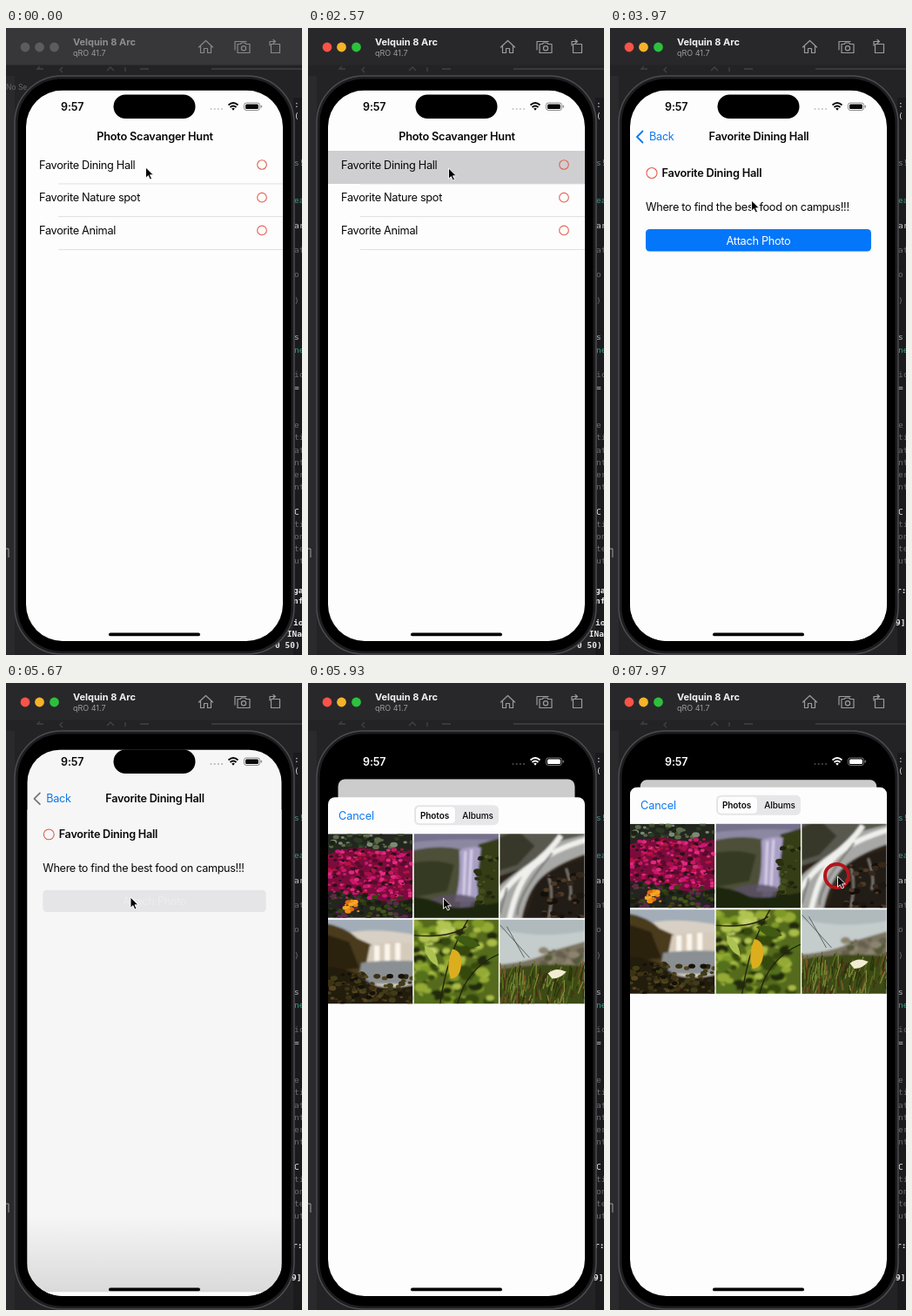
Animation, 340 px wide and 720 px high, one loop 8 s. Source, as an HTML page:

```html
<!DOCTYPE html>
<html lang="en">
<head>
<meta charset="utf-8">
<title>Photo Scavanger Hunt</title>
<style>
  html, body { margin: 0; width: 100%; height: 100%; overflow: hidden; background: #232326; }
  svg { display: block; }
  #stage { width: 340px; height: 720px; }
  text { font-family: Inter, "Open Sans", sans-serif; white-space: pre; }
  .code text { font-family: "DejaVu Sans Mono", monospace; }
</style>
</head>
<body>
<svg id="stage" viewBox="0 0 340 720" xmlns="http://www.w3.org/2000/svg"></svg>
<script>
const LOOP = 8000;
const PAPER = '#fdfdfd', INK = '#080808', BLUE = '#0f79ee', RED = '#e2604f', GREY = '#9b9b9e';

const label = (x, y, s, o = {}) => {
  const { size = 12.75, weight = 400, fill = INK, anchor = 'start', ls = -0.31, id = '' } = o;
  return `<text ${id && `id="${id}"`} x="${x}" y="${y}" font-size="${size}" font-weight="${weight}"
    fill="${fill}" text-anchor="${anchor}" letter-spacing="${ls}">${s}</text>`;
};
const rect = (x, y, w, h, fill, more = '') =>
  `<rect x="${x}" y="${y}" width="${w}" height="${h}" fill="${fill}" ${more}/>`;
const path = (d, fill, more = '') => `<path d="${d}" fill="${fill}" ${more}/>`;
const line = (d, color, w = 1, more = '') =>
  `<path d="${d}" fill="none" stroke="${color}" stroke-width="${w}" ${more}/>`;
const dot = (x, y, r, fill, more = '') => `<circle cx="${x}" cy="${y}" r="${r}" fill="${fill}" ${more}/>`;
const ring = (x, y, r) => dot(x, y, r, 'none', `stroke="${RED}" stroke-width="1.1"`);
const gradient = (id, a, b) =>
  `<linearGradient id="${id}" x2="0" y2="1"><stop stop-color="${a}"/><stop offset="1" stop-color="${b}"/></linearGradient>`;

function random(seed) {
  return () => (seed = (seed * 16807) % 2147483647) / 2147483647;
}
function blobs(seed, n, x, y, w, h, size, colors) {
  const rnd = random(seed);
  let out = '';
  for (let i = 0; i < n; i++) {
    const r = size * (0.5 + rnd());
    out += `<ellipse cx="${(x + rnd() * w).toFixed(1)}" cy="${(y + rnd() * h).toFixed(1)}" rx="${r.toFixed(1)}"
      ry="${(r * 0.7).toFixed(1)}" fill="${colors[Math.floor(rnd() * colors.length)]}"/>`;
  }
  return out;
}
function blades(seed, n, x, y, w, h, len, colors) {
  const rnd = random(seed);
  let out = '';
  for (let i = 0; i < n; i++) {
    const bx = x + rnd() * w, by = y + rnd() * h;
    out += line(`M${bx.toFixed(1)} ${by.toFixed(1)}l${(rnd() * 8 - 2).toFixed(1)} ${(-len * (0.5 + rnd())).toFixed(1)}`,
      colors[Math.floor(rnd() * colors.length)], 1.3);
  }
  return out;
}
const soft = s => `<g filter="url(#soft)">${s}</g>`;

const photos = [
  // flower bed
  rect(0, 0, 97, 97, '#22261f') +
  blobs(5, 45, 0, 0, 97, 16, 3, ['#3d4d2c', '#5c6c4a', '#1a2014', '#7c8a74', '#2c3a22']) +
  path('M0 24Q28 12 52 18T97 18V74Q70 82 50 74T0 66Z', '#7a0c3c') +
  blobs(11, 260, 0, 18, 97, 56, 2.3, ['#cc1668', '#a90f4c', '#e02a80', '#5a0a2c', '#b8123e', '#2c1016', '#c81a78']) +
  blobs(23, 90, 0, 70, 97, 27, 2.6, ['#2c3a14', '#46541e', '#181e0c', '#5a2a4c', '#34162c', '#38460f']) +
  blobs(31, 14, 19, 75, 16, 16, 2.8, ['#f08c14', '#f6a624', '#dc6c14']),
  // valley waterfall
  soft(rect(-5, -5, 107, 107, '#8d88a2') + path('M-5 -5H102V8Q50 4 -5 10Z', '#74708c') +
    path('M-5 20Q30 12 54 18L60 34 50 102H-5Z', '#4e5038') +
    path('M-5 34Q26 28 46 36L38 66 -5 74Z', '#343a20') +
    path('M74 12L102 4V102H58L72 60Z', '#343c18') +
    path('M52 19Q64 13 77 16L72 58Q76 70 70 78H46Q54 60 52 19Z', '#a99fc4') +
    line('M59 20L57 72M66 18L63 74', '#d6cfe6', 3) +
    path('M14 78Q42 64 72 74L68 86H18Z', '#5b5066', 'opacity=".8"') +
    path('M-5 72Q20 74 34 82T102 78V102H-5Z', '#1c2610')) +
  blobs(44, 30, 70, 26, 28, 66, 3, ['#424e1c', '#28300f', '#525c28', '#1e260e']),
  // rocky stream
  soft(rect(-5, -5, 107, 107, '#2b2119') + path('M-5 -5H102V12L50 32 -5 50Z', '#595850') +
    path('M-5 6L20 -5 40 14 20 36 -5 44Z', '#38392c') +
    path('M102 0L62 10 40 30Q14 46 -5 64V102H24Q30 70 44 54 60 36 102 22Z', '#a8a8a6') +
    line('M102 6Q60 18 40 36T10 102M70 2Q56 22 34 38T-4 78', '#efefec', 6) +
    line('M60 22Q40 46 30 64T20 94M8 62L0 92', '#6f6f6c', 2) +
    path('M42 60Q60 38 102 28V102H28Z', '#241a12') +
    line('M56 50Q62 68 56 97M76 40Q84 64 80 76', '#8f8a82', 2)) +
  blobs(56, 34, 50, 46, 46, 50, 3.5, ['#140f0a', '#35271a', '#4c3a26', '#1e1710']),
  // evening falls
  soft(rect(-5, -5, 107, 107, '#d8d0c4') + path('M-5 -5H102V18Q60 10 30 14T-5 6Z', '#a2adb8') +
    path('M-5 4Q20 8 34 22L52 30 42 62 -5 72Z', '#4a3a1c') +
    path('M-5 16L24 26 36 56 -5 60Z', '#2a2210') +
    path('M48 30Q72 22 102 28V50H44Z', '#d6cbbb') +
    line('M56 30V50M68 28V50M80 27V50', '#fbf6ec', 6) +
    path('M38 50Q64 46 102 48V74H34Z', '#8a8f93') +
    path('M-5 54Q28 56 44 70T102 74V102H-5Z', '#211a0d')) +
  blobs(67, 110, 0, 62, 97, 36, 2.8, ['#3e3214', '#151108', '#54451f', '#2c2812', '#403c18']),
  // leaves
  soft(rect(-5, -5, 107, 107, '#556a1c') +
    blobs(71, 110, 0, 0, 97, 97, 6, ['#7f9a26', '#34480f', '#a9bc46', '#202c0a', '#94aa34', '#53701c']) +
    blobs(79, 14, 0, 0, 50, 40, 5, ['#c4d26c', '#b0c450'])) +
  line('M0 18Q40 22 60 8M30 97Q38 40 62 0M97 40Q60 56 50 97', '#25240c', 1.4) +
  path('M44 34Q56 36 54 54 52 68 42 68 36 52 44 34Z', '#dcae1e') +
  path('M46 20Q64 14 76 30 60 36 46 20Z', '#3f5a12') +
  path('M12 30Q26 34 28 54 14 48 12 30Z', '#aec252'),
  // meadow
  soft(rect(-5, -5, 107, 107, '#c4cccc') + path('M-5 -5H102V12Q50 24 -5 10Z', '#b0babd') +
    path('M-5 52Q36 50 60 36L102 24V72H-5Z', '#7c7460') +
    blobs(83, 26, 50, 34, 46, 18, 4, ['#655f4c', '#8d8470', '#525838']) +
    path('M-5 58Q50 48 102 54V102H-5Z', '#3c4a14')) +
  blades(91, 170, 0, 64, 97, 38, 13, ['#5c7020', '#263408', '#7a4e28', '#7c8c38', '#4a2a14', '#3c5014']) +
  line('M0 6L34 44M8 8L28 44', '#4a4a48', 0.8) +
  path('M55 62Q64 54 76 60 70 68 60 68Z', '#f1ecd2')
];

const grid = photos.map((p, i) =>
  `<svg x="${23 + (i % 3) * 98.7}" y="${42 + Math.floor(i / 3) * 98.5}" width="97.2" height="96.6"
    viewBox="0 0 97 97" preserveAspectRatio="none">${p}</svg>`).join('');

const rows = ['Favorite Dining Hall', 'Favorite Nature spot', 'Favorite Animal'].map((s, i) => {
  const y = 157 + i * 37.7;
  return label(38, y + 4.5, s) + ring(294, y, 5.3) + rect(60, y + 21.5, 258, 0.9, '#dcdcde');
}).join('');

// glyphs of the editor window peeking out at the right edge
const DIM = '#6d6d70';
const code = [
  [91, ':', '#ddd'], [104, '(', '#ddd'], [158, 's!', '#4f8f88'], [201, 'ea', '#3f9a80'], [230, 'ar', '#ccc'],
  [258, 'at', DIM], [286, 'o', DIM], [316, ')', DIM], [358, 's', '#b4b4b4'], [373, 'ne', '#35a28a'],
  [401, 'ic', DIM], [416, '=', '#ddd'], [459, 'e', DIM], [473, 'ti', DIM], [488, 'at', DIM],
  [502, 'nt', DIM], [516, 'er', DIM], [530, 'nt', DIM], [559, 'C', '#eee'], [573, 'ti', DIM],
  [587, 'on', DIM], [601, 'te', DIM], [615, 'ut', DIM]
].map(([y, s, c]) => label(331, y, s, { size: 9.5, fill: c, ls: 0 })).join('');
const log = (id, items) => `<g id="${id}">` + items.map(([x, y, s]) =>
  label(x, y, s, { size: 9.5, weight: 700, fill: '#e8e8e8', ls: 0 })).join('') + '</g>';

const iconLine = (d) => line(d, GREY, 1.2, 'stroke-linejoin="round" stroke-linecap="round"');

document.getElementById('stage').innerHTML = `
<defs>
  <clipPath id="glass"><rect x="23" y="71.5" width="295" height="632.5" rx="42"/></clipPath>
  <filter id="soft" x="0" y="0" width="1" height="1"><feGaussianBlur stdDeviation="1.1"/></filter>
  <linearGradient id="fade" x2="0" y2="1">
    <stop stop-color="#000" stop-opacity="0"/><stop offset="1" stop-color="#000" stop-opacity=".14"/>
  </linearGradient>
</defs>
${rect(0, 0, 340, 720, '#232326')}
${rect(0, 55, 10, 665, '#2a2a2d')}${rect(330, 80, 10, 640, '#1b1b1e')}
<g class="code">${code}
  ${log('logA', [[330, 649, 'ga'], [330, 661, 'nf'], [330, 686, 'io'], [317, 699, '&quot;INa'], [309, 712, '0 50)']])}
  ${log('logB', [[329, 649, 'r:'], [328, 686, '9]']])}
</g>
${label(0, 71, 'No Se', { size: 8.5, fill: '#68686b', ls: 0, id: 'note' })}
${line('M0 598h3v10', '#a0a0a3', 1)}
${line('M43 47h-7l3-3M65 45l-3 3 3 3M116 49l4-4 4 4M137 45v5M154 47h10M236 47h104', '#414144', 1.4)}
<rect id="bar" width="340" height="42.5"/>
<g id="lights">${dot(22, 22, 5.4)}${dot(38.5, 22, 5.4)}${dot(55.5, 22, 5.4)}</g>
${label(77, 20, 'Velquin 8 Arc', { size: 11, weight: 700, id: 'device', ls: 0 })}
${label(77, 32, 'qRO 41.7', { size: 9, fill: GREY, ls: 0 })}
<g id="icons">
  ${iconLine('M221.5 22L229.5 14.5 237.5 22M223.5 21V28.5H227.5V23.5H231.5V28.5H235.5V21')}
  ${iconLine('M263 25V15.5H276M266 18.5H269L270.5 17H274.5L276 18.5H280V28.5H266Z')}
  ${dot(273, 23.3, 2.6, 'none', `stroke="${GREY}" stroke-width="1.2"`)}
  ${iconLine('M304.5 18.5H314.5V28.5H304.5ZM303 20V15.5H309M307 13.5L309.5 15.5 307 17.5')}
</g>
${rect(10, 55, 321, 664, '#1d1d20', 'rx="54" stroke="#4c4c50" stroke-width="1.5"')}
${rect(13.5, 58.5, 314, 657, '#000', 'rx="50"')}
<g clip-path="url(#glass)">
  ${rect(20, 70, 300, 640, '#000')}
  <g id="card">
    <rect id="paper" x="23" y="71.5" width="295" height="633" fill="${PAPER}"/>
    <g id="list">${rect(23, 141, 295, 38, PAPER)}
      <rect id="tap" x="23" y="141" width="295" height="38" fill="#cfcfd2"/>${rows}</g>
    <g id="detail">${rect(23, 141, 295, 565, PAPER)}
      <g class="shift">${ring(48, 166.5, 6)}
        ${label(59.5, 171, 'Favorite Dining Hall', { weight: 600, ls: -0.22 })}
        ${label(41, 210, 'Where to find the best food on campus!!!')}
        <rect id="button" x="41" y="231" width="259" height="25.5" rx="4.5"/>
        ${label(170.5, 248.5, 'Attach Photo', { anchor: 'middle', id: 'attach' })}</g></g>
    <g class="shift">
      ${label(171, 129, 'Photo Scavanger Hunt', { weight: 600, anchor: 'middle', id: 'titleA', ls: -0.22 })}
      ${label(171, 129, 'Favorite Dining Hall', { weight: 600, anchor: 'middle', id: 'titleB', ls: -0.22 })}
      <path id="chevron" d="M37.5 118.5L31 125 37.5 131.5" fill="none" stroke-width="1.8" stroke-linecap="round" stroke-linejoin="round"/>
      ${label(45, 129, 'Back', { fill: BLUE, id: 'back' })}
    </g>
    <rect id="dim" x="23" y="71.5" width="295" height="633" fill="#000"/>
  </g>
  <g id="status">
    ${label(63, 94.5, '9:57', { size: 12.5, weight: 600, fill: 'inherit', ls: -0.1 })}
    <g fill="none" stroke="currentColor" stroke-width="1.9">
      <path d="M255.5 88.5Q261 83.5 266.5 88.5M257.5 91Q261 88 264.5 91"/></g>
    ${path('M259.2 92.5Q261 91 262.8 92.5L261 94.7Z', 'currentColor')}
    ${rect(273.5, 86, 18, 8.5, 'none', 'rx="2.6" stroke="currentColor" stroke-opacity=".45"')}
    ${rect(275, 87.4, 15, 5.7, 'currentColor', 'rx="1.5"')}
    ${rect(292.7, 88.7, 1.2, 3, 'currentColor', 'rx=".6" opacity=".5"')}
  </g>
  <g id="signal">${[235.5, 239.7, 243.9, 248.1].map(x => dot(x, 93, 1.1, 'inherit')).join('')}</g>
  <rect id="haze" x="23" y="610" width="295" height="95" fill="url(#fade)"/>
  <g id="sheet">
    ${rect(23, 0, 295, 700, PAPER, 'rx="8"')}
    ${label(35, 25.5, 'Cancel', { fill: BLUE, ls: -0.15 })}
    ${rect(122, 9, 97, 23, '#e7e7e9', 'rx="5.5"')}
    ${rect(123.5, 10.5, 46, 20, PAPER, 'rx="4.5" stroke="#d8d8da" stroke-width=".6"')}
    ${label(145.5, 24.5, 'Photos', { size: 10, weight: 600, anchor: 'middle', ls: -0.1 })}
    ${label(195, 24.5, 'Albums', { size: 10, weight: 500, anchor: 'middle', ls: -0.1 })}
    ${grid}
  </g>
  ${rect(118, 694.5, 105, 3.8, '#000', 'rx="1.9"')}
</g>
${rect(123.5, 76.5, 94, 27.5, '#000', 'rx="13.75"')}
<circle id="click" r="13.5" fill="#fff" fill-opacity=".06" stroke="#b3151c" stroke-width="4"/>
<path id="cursor" d="M0 0V12.2L2.9 9.6 4.9 14 7 13.1 5 8.8H8.9Z" fill="#000" stroke="#fff" stroke-width=".9" stroke-linejoin="round"/>`;

const el = {};
document.querySelectorAll('#stage [id]').forEach(n => el[n.id] = n);
const shifted = document.querySelectorAll('.shift');

const clamp = v => Math.max(0, Math.min(1, v));
const mix = (a, b, p) => a + (b - a) * p;
const span = (t, a, b) => clamp((t - a) / (b - a));
const smooth = p => p * p * (3 - 2 * p);
const spring = (ms, w) => ms <= 0 ? 0 : 1 - (1 + w * ms) * Math.exp(-w * ms);
const blend = (a, b, p) => 'rgb(' + a.map((v, i) => Math.round(mix(v, b[i], p))) + ')';
const set = (n, o) => { for (const k in o) n.setAttribute(k, o[k]); };
const move = (n, x, y = 0) => n.setAttribute('transform', `translate(${x.toFixed(2)} ${y.toFixed(2)})`);
const show = (n, on) => n.setAttribute('visibility', on ? 'visible' : 'hidden');

// pointer stops: time, x, y
const track = [
  [0, 160.5, 160], [770, 160.5, 160], [2070, 161.5, 161], [3400, 161.5, 161], [3970, 162.5, 198],
  [4900, 143, 246], [5670, 143, 246], [5930, 155.5, 247], [6400, 118.5, 265], [6720, 118.5, 265],
  [7080, 140, 300], [7420, 240, 290], [7720, 261.5, 222], [8000, 261.5, 222]
];
function pointer(t) {
  const i = track.findIndex(k => k[0] > t);
  const a = track[i - 1], b = track[i], p = smooth(span(t, a[0], b[0]));
  return [mix(a[1], b[1], p), mix(a[2], b[2], p)];
}

function draw(t) {
  const active = t >= 90;
  const push = spring(t - 2600, 0.0125);
  const rise = spring(t - 5640, 0.0201);
  const lift = spring(t - 5665, 0.022);
  const tint = span(t, 5560, 5660);

  el.bar.setAttribute('fill', active ? '#28282b' : '#37373a');
  const lamps = active ? ['#fb5348', '#f6b32a', '#2cc13c'] : ['#5c5c5f', '#5c5c5f', '#5c5c5f'];
  [...el.lights.children].forEach((n, i) => n.setAttribute('fill', lamps[i]));
  el.device.setAttribute('fill', active ? '#f2f2f2' : '#8e8e91');
  el.icons.setAttribute('opacity', active ? 1 : 0.8);
  show(el.note, !active);
  show(el.logA, t < 3000);
  show(el.logB, t >= 3000);

  show(el.tap, t >= 2570 && push < 0.999);
  show(el.list, push < 0.999);
  show(el.detail, push > 0);
  move(el.list, -90 * push);
  move(el.detail, 297 * (1 - push));
  move(el.titleA, -115 * push);
  el.titleA.setAttribute('opacity', clamp(1 - push * 1.6));
  move(el.titleB, 150 * (1 - push));
  el.titleB.setAttribute('opacity', clamp(push * 1.6 - 0.6));
  move(el.back, 90 * (1 - push));
  el.back.setAttribute('opacity', clamp(push * 1.6 - 0.6));
  set(el.chevron, { stroke: blend([15, 121, 238], [120, 120, 124], tint), opacity: push });
  el.button.setAttribute('fill', blend([4, 118, 250], [235, 235, 237], tint));
  el.attach.setAttribute('fill', blend([255, 255, 255], [244, 244, 246], tint));

  const s = 1 - 0.08 * rise;
  el.card.setAttribute('transform', `translate(170.5 ${388 + 14.5 * rise}) scale(${s}) translate(-170.5 -388)`);
  const corner = rise > 0 ? mix(42, 8, rise) : 0;
  el.paper.setAttribute('rx', corner);
  set(el.dim, { opacity: 0.2 * rise, rx: corner });
  shifted.forEach(n => move(n, 0, 25 * rise));

  const ink = blend([8, 8, 8], [255, 255, 255], smooth(span(rise, 0.12, 0.5)));
  el.status.setAttribute('style', `color:${ink};fill:${ink}`);
  el.signal.setAttribute('fill', blend([200, 200, 202], [72, 72, 75], rise));

  show(el.sheet, lift > 0);
  move(el.sheet, 0, mix(704, 119.7, lift));
  el.haze.setAttribute('opacity', rise > 0 ? clamp(1 - rise) : 0);

  const [x, y] = pointer(t);
  move(el.cursor, x, y);
  move(el.click, x - 1, y - 0.5);
  show(el.click, t >= 7830);
}

const start = performance.now();
function frame() {
  draw((performance.now() - start) % LOOP);
  requestAnimationFrame(frame);
}
frame();
</script>
</body>
</html>
```
